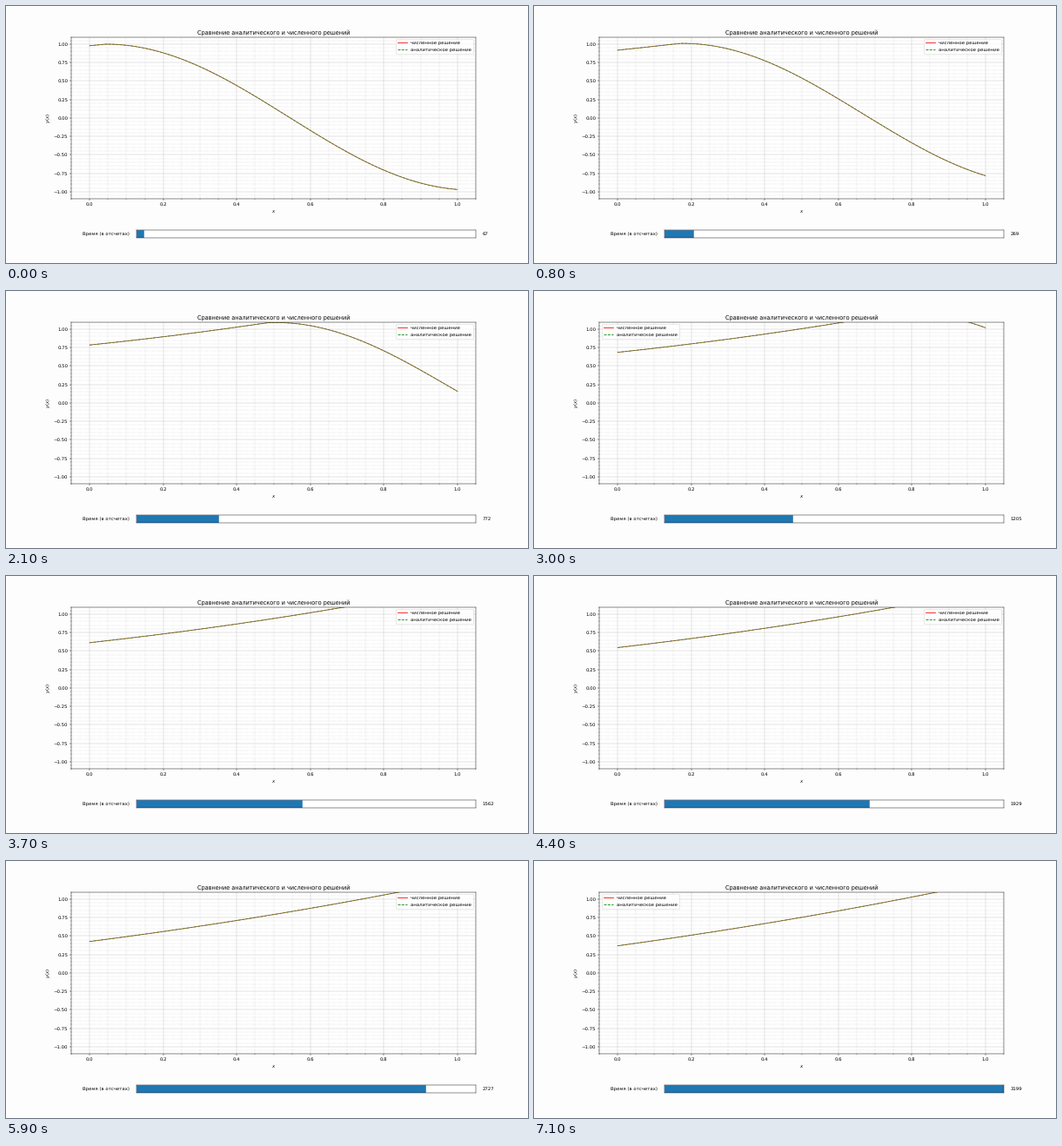
Animation of 600 by 296 pixels, one loop 8 s. Source, as a matplotlib script:

```python
import numpy as np
import matplotlib.pyplot as plt
from matplotlib.animation import FuncAnimation
from matplotlib.patches import Rectangle

plt.rcParams["font.family"] = "DejaVu Sans"
plt.rcParams["text.hinting"] = "none"

WIDTH, HEIGHT = 600, 296
DPI = 100 * WIDTH / 1536    # a 1536 px wide window, scaled down
FRAMES, INTERVAL = 80, 100
STEPS = 3199
SPEED = 2.0

# Slider drag: (frame, time step) knots joined by a smooth curve
KNOT_T = np.array([0, 8, 18, 21, 30, 44, 59, 71], float)
KNOT_N = np.array([67, 269, 750, 772, 1205, 1929, 2727, STEPS], float)
SLOPE = np.gradient(KNOT_N, KNOT_T)


def step_at(frame):
    """Time step under the slider, by cubic Hermite interpolation."""
    f = min(frame, KNOT_T[-1])
    i = min(np.searchsorted(KNOT_T, f, side="right") - 1, len(KNOT_T) - 2)
    h = KNOT_T[i + 1] - KNOT_T[i]
    s = (f - KNOT_T[i]) / h
    n = ((1 + 2 * s) * (1 - s) ** 2 * KNOT_N[i]
         + s * (1 - s) ** 2 * h * SLOPE[i]
         + s * s * (3 - 2 * s) * KNOT_N[i + 1]
         + s * s * (s - 1) * h * SLOPE[i + 1])
    return int(round(n))


def solution(x, t):
    """u_t + 2 u_x = x + t, with u(x, 0) = cos(pi x), u(0, t) = exp(-t)."""
    ahead = np.cos(np.pi * (x - SPEED * t)) + x * t - t * t / 2
    behind = np.exp(x / SPEED - t) + x * t / 2 + x * x / 8
    return np.where(x >= SPEED * t, ahead, behind)


fig, ax = plt.subplots(figsize=(WIDTH / DPI, HEIGHT / DPI), dpi=DPI,
                       facecolor="#fefdfe")
fig.subplots_adjust(left=0.125, right=0.9, bottom=0.249, top=0.88)

x = np.linspace(0, 1, 1001)
numeric, = ax.plot(x, solution(x, 0), "r", label="численное решение")
exact, = ax.plot(x, solution(x, 0), "g--", label="аналитическое решение")
ax.set(xlim=(-0.05, 1.05), ylim=(-1.1, 1.1), xlabel="$x$", ylabel="$y(x)$",
       title="Сравнение аналитического и численного решений")
ax.minorticks_on()
ax.grid(which="major", color="#c0c0c0")
ax.grid(which="minor", color="#c0c0c0", linestyle=":")
ax.legend(loc="best")

# The overlapping curves blend towards olive; the legend keeps pure colours
numeric.set_color("#a0602a")
exact.set_color("#5f742a")

bar_ax = fig.add_axes([0.25, 0.097, 0.65, 0.03])
bar_ax.set(xlim=(0, STEPS), ylim=(0, 1), xticks=[], yticks=[])
bar = bar_ax.add_patch(Rectangle((0, 0), 0, 1, color="C0"))
bar_ax.text(-0.02, 0.5, "Время (в отсчетах)", transform=bar_ax.transAxes,
            ha="right", va="center")
value = bar_ax.text(1.02, 0.5, "", transform=bar_ax.transAxes,
                    ha="left", va="center")


def update(frame):
    n = step_at(frame)
    y = solution(x, n / STEPS)
    numeric.set_ydata(y)
    exact.set_ydata(y)
    bar.set_width(n)
    value.set_text(str(n))
    return numeric, exact, bar, value


anim = FuncAnimation(fig, update, frames=FRAMES, interval=INTERVAL,
                     init_func=lambda: update(0), repeat=True, repeat_delay=0)
plt.show()
```
